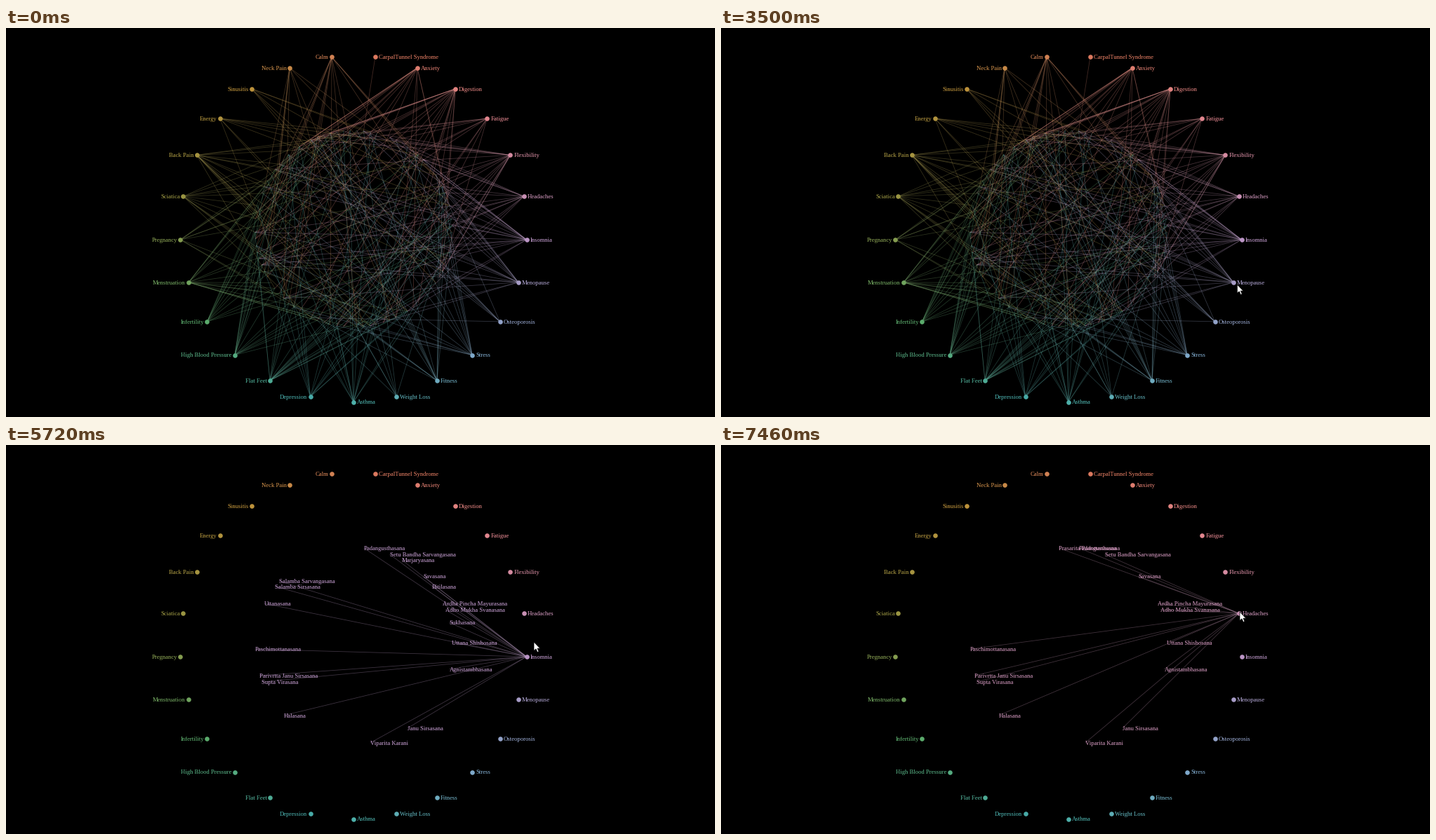
Animation, 1010 px wide and 555 px high, one loop 8 s. Source, as a matplotlib script:

```python
import math
import random

import numpy as np
import matplotlib.pyplot as plt
from matplotlib.animation import FuncAnimation
from matplotlib.collections import LineCollection
from matplotlib.colors import to_rgb
from matplotlib.patches import Polygon

W, H, DPI = 1010, 555, 100
LOOP, STEP = 8000, 40
PX = 72 / DPI
CX, CY = 495, 286.5
R_OUT, R_IN, N_IN = 247, 140.5, 92

# counter-clockwise from the bottom
AILMENTS = [
    "Asthma", "Weight Loss", "Fitness", "Stress", "Osteoporosis", "Menopause",
    "Insomnia", "Headaches", "Flexibility", "Fatigue", "Digestion", "Anxiety",
    "CarpalTunnel Syndrome", "Calm", "Neck Pain", "Sinusitis", "Energy",
    "Back Pain", "Sciatica", "Pregnancy", "Menstruation", "Infertility",
    "High Blood Pressure", "Flat Feet", "Depression",
]
# evenly spaced around the outer ring
HUES = np.array([to_rgb(c) for c in (
    "#55c3bd", "#8cbbe0", "#d0a6dc", "#fb959f", "#f4866a", "#d2a242",
    "#aba649", "#65be78", "#50bdba")])

# place on the inner ring -> pose, grouped by use
RESTFUL = {
    -22: "Padangusthasana", -18: "Setu Bandha Sarvangasana", -12: "Savasana",
    -7: "Ardha Pincha Mayurasana", -6: "Adho Mukha Svanasana",
    -1: "Uttana Shishosana", 3: "Agnistambhasana", 14: "Janu Sirsasana",
    20: "Viparita Karani", 34: "Halasana", 40: "Supta Virasana",
    41: "Parivrtta Janu Sirsasana", 45: "Paschimottanasana",
}
INVERTED = {-40: "Uttanasana", -37: "Salamba Sirsasana",
            -36: "Salamba Sarvangasana"}
SLEEPY = {-16: "Marjaryasana", -10: "Bitilasana", -4: "Sukhasana"}
FOLDED = {-25: "Prasarita Padottanasana"}
ACTIVE = {
    -34: "Urdhva Dhanurasana", -30: "Urdhva Mukha Svanasana",
    -29: "Virabhadrasana I", -28: "Virabhadrasana II",
    -27: "Virabhadrasana III", -21: "Paripurna Navasana",
    -8: "Makara Adho Mukha Svanasana", 0: "Utthita Parsvakonasana",
    6: "Chaturanga Dandasana", 21: "Salabhasana", 33: "Vasisthasana",
    42: "Parivrtta Parsvakonasana", 43: "Parivrtta Trikonasana",
}
POSES = {**RESTFUL, **INVERTED, **SLEEPY, **FOLDED, **ACTIVE}
USES = {
    "Fitness": [*ACTIVE, -7],
    "Menopause": [*RESTFUL, *INVERTED],
    "Insomnia": [*RESTFUL, *INVERTED, *SLEEPY],
    "Headaches": [*RESTFUL, *FOLDED],
    "CarpalTunnel Syndrome": [-22],
}
RARE = ("Weight Loss", "Pregnancy", "Neck Pain", "Sinusitis", "Energy",
        "Osteoporosis")

# time -> highlighted ailment
STATES = [
    (0, None), (1250, "Fitness"), (2530, None), (3630, "Menopause"),
    (3760, None), (4650, "Menopause"), (5500, None), (5640, "Insomnia"),
    (5780, None), (6320, "Headaches"), (6455, None), (7310, "Headaches"),
]
# time, x, y of the pointer
PATH = np.array([
    (250, 870, 548), (930, 621, 504), (1250, 614, 502), (2500, 614, 502),
    (2540, 624, 500), (3040, 779, 395), (3230, 745, 372), (3760, 726, 360),
    (4170, 730, 360), (5500, 730, 360), (5740, 752, 281), (6260, 738, 243),
    (6930, 736, 240), (7310, 739, 238),
])
IBEAM = [(900, 1130), (2530, 2610)]
ARROW = np.array([(0, 0), (0, 12.6), (2.9, 9.9), (5, 14.6), (7, 13.7),
                  (5, 9.2), (8.8, 9.2)])


def outer(k):
    a = 2 * math.pi * k / len(AILMENTS)
    return CX + R_OUT * math.sin(a), CY + R_OUT * math.cos(a)


def inner(i):
    a = 2 * math.pi * (i + 0.5) / N_IN
    return CX + R_IN * math.cos(a), CY + R_IN * math.sin(a)


def ailment_color(k):
    pos = k / (len(AILMENTS) - 1) * (len(HUES) - 1)
    return np.array([np.interp(pos, range(len(HUES)), ch) for ch in HUES.T])


def pick_places(name):
    """Places on the inner ring, named poses twice as likely as others."""
    if name in USES:
        return USES[name]
    count = rng.randint(6, 9) if name in RARE else rng.randint(11, 20)
    places = range(-N_IN // 2, N_IN // 2)
    by_weight = sorted(
        places, key=lambda i: rng.random() ** (0.5 if i in POSES else 1))
    return by_weight[-count:]


def label(x, y, text, color, ha="left"):
    return ax.text(x, y + 2.9, text, color=color, family="Liberation Serif",
                   fontsize=8.6 * PX, va="baseline", ha=ha, zorder=4)


def lines(segments, colors):
    return ax.add_collection(LineCollection(
        segments, colors=colors, alpha=0.29, linewidths=0.85 * PX, zorder=1))


fig = plt.figure(figsize=(W / DPI, H / DPI), dpi=DPI, facecolor="black")
ax = fig.add_axes([0, 0, 1, 1])
ax.set_xlim(0, W)
ax.set_ylim(H, 0)
ax.axis("off")

rng = random.Random(4)
segments, colors = [], []
groups = {}
shown = {name for _, name in STATES if name}
for k, name in enumerate(AILMENTS):
    x, y = outer(k)
    color = ailment_color(k)
    line_color = 0.8 * color + 0.2 * color.mean()
    places = pick_places(name)
    own = [(inner(i), (x, y)) for i in places]
    segments += own
    colors += [line_color] * len(own)
    if k <= AILMENTS.index("CarpalTunnel Syndrome"):
        label(x + 5, y, name, color)
    else:
        label(x - 4.5, y, name, color, "right")
    ax.scatter([x], [y], s=(6.6 * PX) ** 2, color=[0.9 * color],
               linewidths=0, zorder=3)
    if name in shown:
        groups[name] = [lines(own, [line_color])]
        groups[name] += [label(*inner(i), POSES[i], color) for i in places]
groups[None] = [lines(segments, colors)]

arrow = ax.add_patch(Polygon(ARROW, closed=True, facecolor="white",
                             edgecolor="black", linewidth=0.5, zorder=6))
ibeam, = ax.plot([], [], color="#a0a0a0", linewidth=PX, zorder=6)
BEAM_X = np.array([-3, 3, 0, 0, -3, 3])
BEAM_Y = np.array([-6, -6, -6, 6, 6, 6])


def draw(frame):
    t = frame * STEP + STEP / 2
    state = [name for start, name in STATES if start <= t][-1]
    for name, artists in groups.items():
        for artist in artists:
            artist.set_visible(name == state)

    x = np.interp(t, PATH[:, 0], PATH[:, 1])
    y = np.interp(t, PATH[:, 0], PATH[:, 2])
    on_text = any(a <= t < b for a, b in IBEAM)
    arrow.set_visible(t >= PATH[0, 0] and not on_text)
    arrow.set_xy(ARROW + (x, y))
    ibeam.set_visible(on_text)
    ibeam.set_data(x + BEAM_X, y + BEAM_Y)
    return []


anim = FuncAnimation(fig, draw, frames=LOOP // STEP, interval=STEP,
                     init_func=lambda: draw(0), repeat=True, repeat_delay=0)
plt.show()
```
